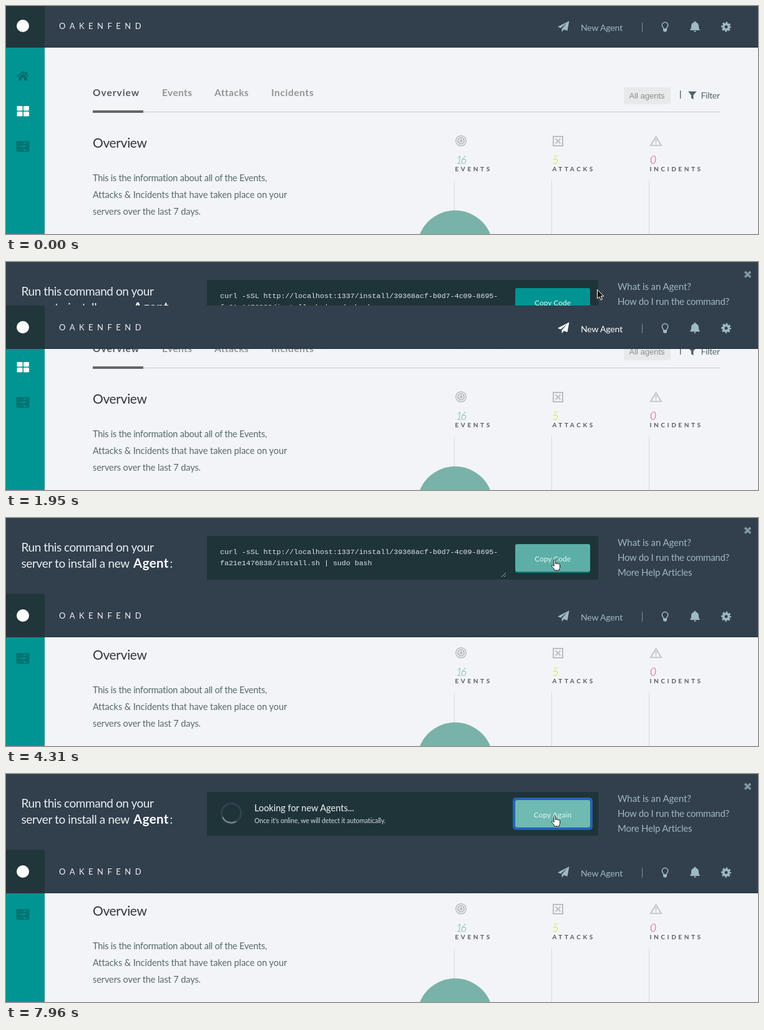
Recreate the animation shown at these times as an HTML page. Size 1205 by 367 pixels, loop 8000 ms.

```html
<!DOCTYPE html>
<html lang="en">
<head>
<meta charset="utf-8">
<title>Agent install panel</title>
<style>
  html, body { margin: 0; width: 100%; height: 100%; overflow: hidden; background: #f3f4f8; }
  svg { display: block; width: 100%; height: 100%; font-family: Lato, sans-serif; }
  text { white-space: pre; }
  .tab { font-size: 15.5px; font-weight: 700; fill: #949494; }
  .body { font-size: 14.5px; fill: #556a6c; }
  .label { font-size: 10px; font-weight: 700; letter-spacing: 3.6px; fill: #58595b; }
  .num { font-size: 17.5px; font-weight: 300; font-style: italic; letter-spacing: -2.6px; }
  .mono { font-family: "Liberation Mono", monospace; font-size: 11.6px; fill: #dde5e5; }
  .lead { font-size: 19px; fill: #e9eef0; }
  .help { font-size: 15px; fill: #9fb7c0; }
  .btn { font-size: 12px; fill: #e6f5f3; }
  .select { font-family: "Liberation Sans", sans-serif; font-size: 13px; fill: #8b8c8e; }
  .line { fill: none; stroke: #b9c0c3; stroke-width: 2; }
</style>
</head>
<body>
<svg viewBox="0 0 1205 367" xmlns="http://www.w3.org/2000/svg">
  <defs>
    <clipPath id="reveal"><rect id="revealBox" width="1205" height="0"/></clipPath>
    <linearGradient id="edge" x2="0" y2="1">
      <stop offset="0" stop-color="#2b3643" stop-opacity="0"/>
      <stop offset="1" stop-color="#2b3643" stop-opacity=".6"/>
    </linearGradient>
  </defs>

  <!-- page -->
  <rect width="1205" height="367" fill="#f3f4f8"/>
  <rect width="62" height="367" fill="#009492"/>
  <g fill="#006e6d">
    <path d="M20.5 114.5L27 109l6.5 5.500V120H29v-4.500h-4V120h-4.500z"/>
    <path d="M17.800 113.500L27 106l9.200 7.500" fill="none" stroke="#006e6d" stroke-width="2"/>
    <path d="M31.500 106h2.500v5l-2.500-2z"/>
  </g>
  <g fill="#fff">
    <rect x="17.5" y="161" width="9" height="7.500" rx="1.300"/>
    <rect x="28" y="161" width="9" height="7.500" rx="1.300"/>
    <rect x="17.5" y="170" width="9" height="7.500" rx="1.300"/>
    <rect x="28" y="170" width="9" height="7.500" rx="1.300"/>
  </g>
  <g fill="none" stroke="#006765" stroke-width="1.300">
    <path d="M17.500 218.500h19v3.800h-19zM17.500 224.200h19v3.800h-19zM17.500 229.900h19v3.800h-19z"/>
    <path d="M19 220.400h9M32 220.400h3M19 226.100h5M32 226.100h3M19 231.800h9M32 231.800h3"/>
  </g>

  <g class="tab">
    <text x="139" y="145" fill="#58595b" letter-spacing="1">Overview</text>
    <text x="250" y="145" letter-spacing=".4">Events</text>
    <text x="334" y="145" letter-spacing=".4">Attacks</text>
    <text x="425" y="145" letter-spacing=".6">Incidents</text>
  </g>
  <rect x="139" y="170" width="1005" height="1" fill="#c6c8cb"/>
  <rect x="139" y="168" width="81" height="4" fill="#666567"/>
  <rect x="990" y="131" width="75" height="27" rx="2" fill="#e8e9ea"/>
  <text class="select" x="998.5" y="149">All agents</text>
  <rect x="1080" y="136" width="1.300" height="13" fill="#40666b"/>
  <path d="M1093 137.500h13.500l-5 6v7l-3.500-2.500v-4.500z" fill="#4b6468"/>
  <text x="1113.5" y="149" font-size="14" letter-spacing="-.3" fill="#506669">Filter</text>

  <text x="139" y="228" font-size="21" letter-spacing="-.35" fill="#333338">Overview</text>
  <g class="body">
    <text x="139" y="282" letter-spacing="-.25">This is the information about all of the Events,</text>
    <text x="139" y="309" letter-spacing="-.06">Attacks &amp; Incidents that have taken place on your</text>
    <text x="139" y="336" letter-spacing="-.1">servers over the last 7 days.</text>
  </g>

  <g class="line">
    <circle cx="729" cy="217" r="8.200" stroke-width="1.700"/>
    <circle cx="729" cy="217" r="4.900" stroke-width="2.200"/>
    <circle cx="729" cy="217" r="2.500" fill="#b9c0c3" stroke="none"/>
    <path d="M877 210h15v15h-15zM880.500 213.500l8 8M888.500 213.500l-8 8"/>
    <path d="M1041.500 210.500l8.500 14h-17z" stroke-width="1.700"/>
    <path d="M1041.500 214.500v5M1041.500 221v1.800" stroke-width="1.700"/>
  </g>
  <g class="num">
    <text x="721" y="254" fill="#62b2a6">16</text>
    <text x="875.5" y="254" fill="#d3da1c">5</text>
    <text x="1032" y="254" fill="#ea3a62">0</text>
  </g>
  <g class="label">
    <text x="719.5" y="266">EVENTS</text>
    <text x="875.5" y="266">ATTACKS</text>
    <text x="1031.5" y="266">INCIDENTS</text>
  </g>
  <path d="M718.500 281v90M874.500 281v90M1030.500 281v90" stroke="#d8dade"/>
  <circle cx="719.6" cy="389.8" r="60.8" fill="#79b2a9"/>

  <!-- install panel, uncovered by the header sliding down -->
  <g clip-path="url(#reveal)">
    <rect width="1205" height="130" fill="#323f4d"/>
    <g class="lead">
      <text x="24.5" y="54" letter-spacing="-.45">Run this command on your</text>
      <text x="24.5" y="80" letter-spacing="-.37">server to install a new</text>
      <text x="204" y="80" font-size="20.5" font-weight="700" letter-spacing=".4" fill="#fff">Agent</text>
      <text x="262.5" y="80">:</text>
    </g>
    <rect x="322" y="29" width="627" height="70" fill="#1f3439"/>
    <g id="command">
      <rect id="active" x="323" y="30" width="625" height="68" fill="#29323c" stroke="#566f74" stroke-width="2"/>
      <g id="code" class="mono">
        <text x="343" y="58">curl -sSL http://localhost:1337/install/39368acf-b0d7-4c09-8695-</text>
        <text x="343" y="76">fa21e1476838/install.sh | sudo bash</text>
      </g>
      <path d="M794 95l7-7M798 95l3-3" stroke="#9aa5a8"/>
    </g>
    <g id="looking">
      <circle cx="361" cy="63" r="15.5" fill="none" stroke="#31434b" stroke-width="3"/>
      <path id="arc" fill="none" stroke="#72878b" stroke-width="2.500"/>
      <text x="398" y="60" font-size="14.5" fill="#f2f5f5">Looking for new Agents...</text>
      <text x="398" y="79" font-size="10.5" letter-spacing="-.1" fill="#d5dcdd">Once it's online, we will detect it automatically.</text>
    </g>
    <rect id="ring" x="814" y="40" width="124" height="48" rx="3" fill="#1f5bb0" stroke="#2463b8" stroke-width="4"/>
    <rect id="lip" x="816" y="44" width="120" height="44" rx="3"/>
    <rect id="face" x="816" y="42" width="120" height="44" rx="3"/>
    <text id="copy" class="btn" x="847" y="69.5">Copy Code</text>
    <text id="again" class="btn" x="845.5" y="69.5" letter-spacing=".1">Copy Again</text>
    <g class="help">
      <text x="980" y="45" letter-spacing="-.1">What is an Agent?</text>
      <text x="980" y="69" letter-spacing="-.3">How do I run the command?</text>
      <text x="980" y="93" letter-spacing="-.22">More Help Articles</text>
    </g>
  </g>

  <g id="header">
    <rect y="-3" width="1205" height="70" fill="#323f4d"/>
    <rect y="63" width="1205" height="4" fill="url(#edge)"/>
    <rect y="-3" width="62" height="70" fill="#21363b"/>
    <circle cx="27" cy="32" r="10" fill="#fff"/>
    <text x="85" y="37" font-size="13" letter-spacing="6.500" fill="#eef1f3">OAKENFEND</text>
    <g transform="translate(0 .6)">
      <g id="newAgent">
        <path d="M902.500 23.500l-3 16-5.500-2.300-3.400 4.300v-5.400l8.400-9.600-10.200 8.400-4.800-2z"/>
        <text x="921" y="39.3" font-size="14" letter-spacing="-.15">New Agent</text>
      </g>
      <rect x="1019" y="26" width="1" height="15" fill="#7e949e"/>
      <g fill="#9fbac4">
        <path d="M1053.800 36.300c0-2.300-2.500-3-2.500-6a4.700 4.700 0 0 1 9.400 0c0 3-2.500 3.700-2.500 6z" fill="none" stroke="#9fbac4" stroke-width="1.500"/>
        <path d="M1053 36.500h6v3l-1.500 1.500h-3l-1.500-1.500z"/>
        <path d="M1104 24c1 0 1.500.7 1.500 1.600 3.200.8 4.500 3.300 4.500 6.400 0 3.500.7 4.500 2.300 6.300h-16.600c1.600-1.800 2.300-2.800 2.300-6.300 0-3.100 1.300-5.600 4.500-6.400 0-.9.500-1.600 1.500-1.600zM1102 39.200h4a2 2 0 0 1-4 0z"/>
        <circle cx="1154" cy="33" r="4.300" fill="none" stroke="#9fbac4" stroke-width="3.600"/>
        <circle cx="1154" cy="33" r="6.500" fill="none" stroke="#9fbac4" stroke-width="3" stroke-dasharray="3 2.105" stroke-dashoffset="1.500"/>
      </g>
    </g>
  </g>
  <path id="close" d="M1184 15.500l9 9M1193 15.500l-9 9" stroke="#80979f" stroke-width="3.800"/>

  <path id="arrow" d="M.5.500v14.500l3.300-3.100 2.300 5.300 2.500-1.100-2.300-5.100h4.500z" fill="#111" stroke="#fff"/>
  <path id="hand" d="M-1.500 1c0-1.500 2.600-1.500 2.600 0v5c.4-.9 2.300-.8 2.500.3.500-.8 2.300-.6 2.500.5.600-.6 2.100-.3 2.100 1v3.700c0 2-1.400 2.800-1.400 5.200h-7.200c-.5-2.500-3.300-4.300-4.600-6.600-.8-1.500 1-2.500 2-1.400l1.500 1.500z" fill="#fff" stroke="#111"/>
</svg>
<script>
const LOOP = 8000;
const $ = id => document.getElementById(id);
const set = (id, attrs) => { for (const k in attrs) $(id).setAttribute(k, attrs[k]); };
const clamp = v => Math.max(0, Math.min(1, v));
const mix = (a, b, p) => a + (b - a) * p;
const ease = p => p * p * (3 - 2 * p);
// progress from a to b, held in n equal steps
const steps = (t, a, b, n) => clamp(Math.floor((t - a) / (b - a) * n + 1e-6) / n);
const rgb = (a, b, p) => `rgb(${a.map((v, i) => Math.round(mix(v, b[i], p)))})`;

const TEAL = [0, 148, 146], DARK_TEAL = [0, 126, 126], LIP = [8, 140, 140];
const HOVER = [92, 175, 167], FOCUS = [111, 186, 178];
const MUTED = [159, 186, 196], WHITE = [255, 255, 255];

function slide(t) {
  if (t < 1710) return 0;
  if (t < 1770) return 4;
  return Math.min(125, 21 + 26 * Math.floor((t - 1770) / 90));
}

function pointer(t) {
  if (t >= 3720) {
    const p = ease(steps(t, 3720, 4310, 9));
    return [mix(947, 879.5, p), mix(44, 67.5, p)];
  }
  if (t >= 1470) return [947, 44];
  const p = ease(steps(t, 574, 1410, 11));
  return [mix(1010, 942, p), mix(334, 45, p)];
}

function arcPath(from, to) {
  const at = deg => {
    const a = deg * Math.PI / 180;
    return `${361 + 15.5 * Math.cos(a)} ${63 + 15.5 * Math.sin(a)}`;
  };
  return `M${at(from)}A15.5 15.5 0 0 1 ${at(to)}`;
}

function draw(t) {
  const y = slide(t);
  set('header', { transform: `translate(0 ${y})` });
  set('revealBox', { height: Math.max(0, y - 3) });
  set('close', { opacity: y > 0 ? 1 : 0 });

  const lit = steps(t, 1260, 1410, 2) - steps(t, 3720, 3982, 4);
  set('newAgent', { fill: rgb(MUTED, WHITE, lit) });

  const over = steps(t, 3850, 4244, 6);
  const focus = steps(t, 5800, 6150, 6);
  set('face', { fill: focus ? rgb(HOVER, FOCUS, focus) : rgb(TEAL, HOVER, over) });
  set('lip', { fill: rgb(DARK_TEAL, LIP, over), opacity: 1 - focus });
  set('ring', { opacity: focus });
  set('copy', { opacity: focus ? 0 : 1 });
  set('again', { opacity: focus ? 1 : 0 });
  set('active', { opacity: focus });
  set('code', { transform: `translate(0 ${focus ? -1 : 0})` });

  const swap = steps(t, 6870, 7620, 11);
  set('command', { opacity: clamp(1 - 2 * swap) });
  set('looking', { opacity: clamp(2 * swap - 1) });
  const spin = Math.floor((t - 7960) / 56) * 11.2;
  set('arc', { d: arcPath(60 + spin, 155 + spin) });

  const [px, py] = pointer(t);
  const isHand = t >= 3720 && px < 936;
  const at = `translate(${px.toFixed(1)} ${py.toFixed(1)})`;
  set('arrow', { transform: at, opacity: t >= 500 && !isHand ? 1 : 0 });
  set('hand', { transform: at, opacity: isHand ? 1 : 0 });
}

const start = performance.now();
function tick() {
  draw((performance.now() - start) % LOOP);
  requestAnimationFrame(tick);
}
tick();
</script>
</body>
</html>
```
